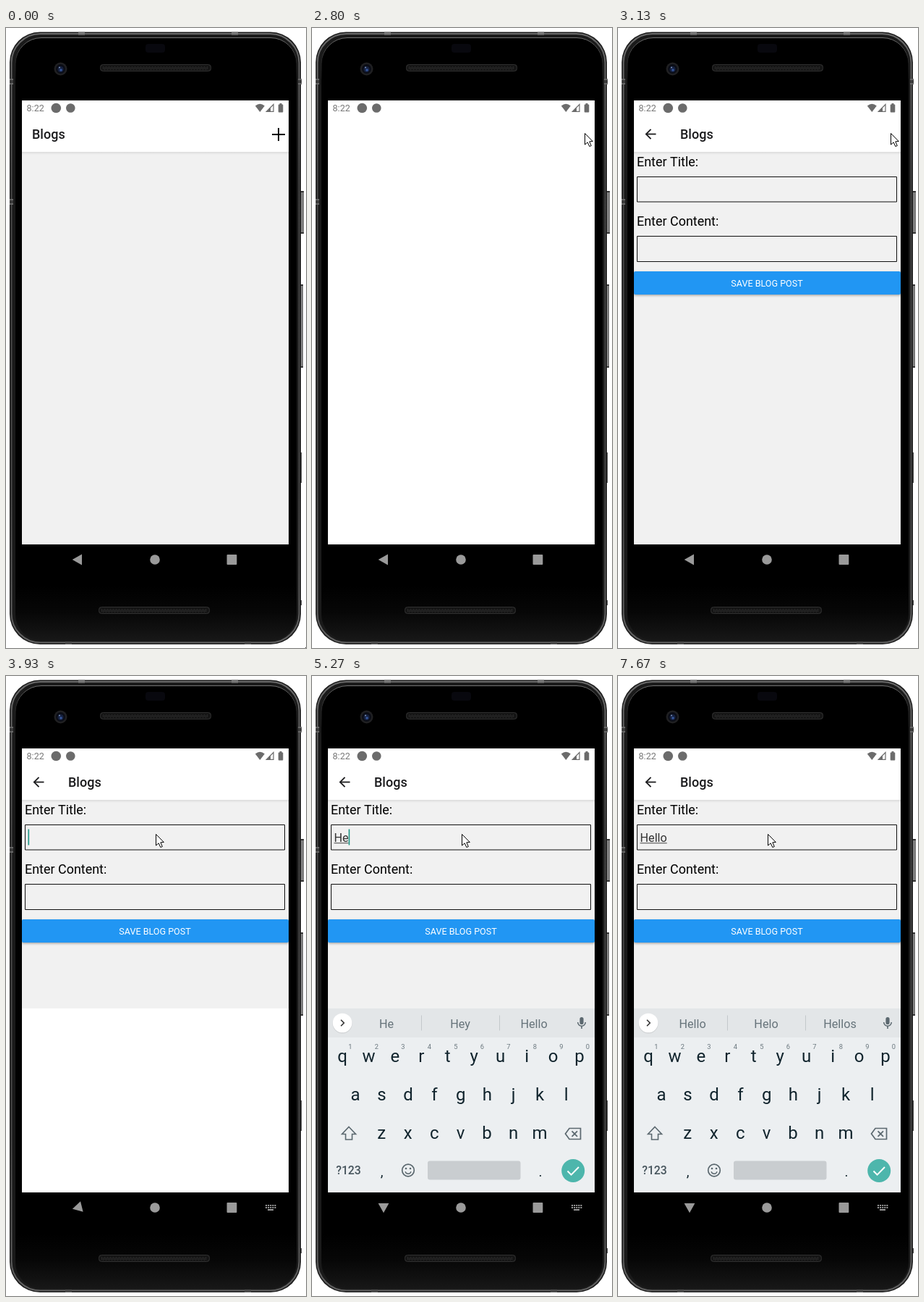
Animation of 415 by 856 pixels, one loop 8 s. Source, as an HTML page with a canvas:

```html
<!DOCTYPE html>
<html lang="en">
<head>
<meta charset="utf-8">
<title>Blog post form</title>
<style>
html, body { margin: 0; width: 100%; height: 100%; overflow: hidden; background: #fff; }
canvas { display: block; width: 415px; height: 856px; }
</style>
</head>
<body>
<canvas id="stage" width="415" height="856"></canvas>
<script>
const g = document.getElementById('stage').getContext('2d');
const LOOP = 8000, FRAME = 1000 / 15;
const SCREEN = { x: 22, y: 100, w: 369, h: 613 };
const PAGE = '#f1f1f1', INK = '#11242d', ICON = '#5b686f';

// ---- helpers ----
const lerp = (a, b, k) => a + (b - a) * k;
const clamp = k => Math.max(0, Math.min(1, k));
const smooth = k => k * k * (3 - 2 * k);

function rect(x, y, w, h, fill, r = 0) {
  g.fillStyle = fill;
  g.beginPath();
  g.roundRect(x, y, w, h, r);
  g.fill();
}
function box(x, y, w, h, stroke, width = 1, r = 0) {
  g.strokeStyle = stroke;
  g.lineWidth = width;
  g.beginPath();
  g.roundRect(x, y, w, h, r);
  g.stroke();
}
function disc(x, y, r, fill) {
  g.fillStyle = fill;
  g.beginPath();
  g.arc(x, y, r, 0, Math.PI * 2);
  g.fill();
}
function ring(x, y, r, stroke, width, from = 0, to = Math.PI * 2) {
  g.strokeStyle = stroke;
  g.lineWidth = width;
  g.beginPath();
  g.arc(x, y, r, from, to);
  g.stroke();
}
function trace(points, closed) {
  g.beginPath();
  points.forEach(([x, y]) => g.lineTo(x, y));
  if (closed) g.closePath();
}
function line(points, stroke, width, closed = false) {
  trace(points, closed);
  g.strokeStyle = stroke;
  g.lineWidth = width;
  g.stroke();
}
function poly(points, fill) {
  trace(points, true);
  g.fillStyle = fill;
  g.fill();
}
function text(s, x, y, size, fill, align = 'left', weight = 400) {
  g.font = `${weight} ${size}px Roboto, sans-serif`;
  g.textAlign = align;
  g.fillStyle = fill;
  g.fillText(s, x, y);
}
function gradient(x0, y0, x1, y1, ...colors) {
  const fade = g.createLinearGradient(x0, y0, x1, y1);
  colors.forEach((c, i) => fade.addColorStop(i / (colors.length - 1), c));
  return fade;
}
const vertical = (y0, y1, ...colors) => gradient(0, y0, 0, y1, ...colors);
const horizontal = (x0, x1, ...colors) => gradient(x0, 0, x1, 0, ...colors);

function layer(draw) {
  g.save();
  draw();
  g.restore();
}
function bezier(x, x1, y1, x2, y2) {
  const at = (s, a, b) => 3 * (1 - s) ** 2 * s * a + 3 * (1 - s) * s * s * b + s ** 3;
  let lo = 0, hi = 1;
  for (let i = 0; i < 24; i++) {
    const mid = (lo + hi) / 2;
    if (at(mid, x1, x2) < x) lo = mid; else hi = mid;
  }
  return at(lo, y1, y2);
}

// ---- phone ----
function speaker(x, y) {
  rect(x, y, 154, 10, '#151515', 4);
  box(x + .5, y + .5, 153, 9, '#303030', 1, 4);
  g.fillStyle = '#2b2b2b';
  for (let i = 4; i < 150; i += 2) g.fillRect(x + i, y + 3 + (i / 2 % 2), 1, 4);
}
function sideButton(y, h, w) {
  rect(406, y, w, h, horizontal(406, 406 + w, '#3a3a3a', '#8c8c8c', '#6a6a6a'), 1);
  rect(406, y, w, 2, '#333');
  rect(406, y + h - 2, w, 2, '#333');
}
function phone() {
  sideButton(225, 59, 6);
  sideButton(354, 115, 5);
  rect(406, 586, 3, 42, '#444');
  rect(406, 790, 3, 7, '#444');
  rect(5, 5.5, 403, 845.5, '#1b1b1b', 42);
  box(7.5, 8, 398, 840.5, vertical(8, 848, '#6a6a6a', '#444', '#444', '#444', '#606060'), 2, 40);
  box(10.5, 11, 392, 834.5, '#1a1a1a', 2.5, 38);
  rect(13, 13, 389, 832.5, vertical(770, 845, '#000', '#070707', '#171717'), 36);
  layer(() => {
    g.beginPath();
    g.rect(0, 0, 415, 70);
    g.clip();
    box(13, 13.5, 389, 832, vertical(13, 70, '#757575', '#2a2a2a', '#111'), 1, 36);
  });
  [[5, 70], [5, 236], [404, 70]].forEach(([x, y]) => {
    rect(x, y, 5, 8, '#666');
    rect(x, y + 2, 5, 4, '#3a3a3a');
  });
  [100, 312].forEach(x => rect(x, 5.5, 9, 4, '#777'));
  [82, 330].forEach(x => rect(x, 847, 9, 4, '#4a4a4a'));

  rect(193, 22, 27, 12, '#08080e', 4);
  disc(75.5, 56.5, 9, '#202022');
  disc(75.5, 56.5, 6.5, '#0b0d16');
  disc(75.5, 57, 4, '#16213f');
  disc(76, 58, 1.8, '#35569c');
  disc(74, 54.5, 1, '#7f95bd');
  speaker(130, 50);
  speaker(128, 799);
}

function statusBar() {
  const grey = '#6b6b6b';
  text('8:22', 28.5, 115.3, 12.6, '#777');
  disc(69.3, 110.5, 6.8, grey);
  disc(89.3, 110.5, 6.3, grey);
  g.fillStyle = grey;
  g.beginPath();
  g.moveTo(351.3, 116);
  g.lineTo(344.8, 107.5);
  g.quadraticCurveTo(351.3, 102, 357.8, 107.5);
  g.fill();
  line([[370, 105.5], [370, 115.3], [360.3, 115.3]], grey, 1.2, true);
  poly([[366, 109.5], [366, 115.5], [360, 115.5]], grey);
  rect(376.7, 105.5, 6.6, 11, grey, 1);
  rect(378.5, 104, 3, 2, grey);
}

function navBar(turn, keyboardIcon) {
  const grey = '#9a9a9a';
  layer(() => {
    g.translate(99, 734);
    g.rotate(-turn * Math.PI / 2);
    poly([[-7.3, 0], [6, -7.4], [6, 7.4]], grey);
  });
  disc(206, 734, 6.8, grey);
  rect(305.5, 727, 13.8, 14, grey, 1);
  if (!keyboardIcon) return;
  for (let row = 0; row < 2; row++)
    for (let i = 0; i < 5; i++) rect(359 + i * 3.1, 730 + row * 3, 2, 2, grey);
  rect(362, 736, 8, 2, grey);
}

// ---- app screens ----
function header(title, x) {
  rect(SCREEN.x, SCREEN.y, SCREEN.w, SCREEN.h, PAGE);
  rect(22, 171, 369, 4, vertical(171, 175, '#dcdcdc', PAGE));
  rect(22, 100, 369, 71, '#fff');
  text(title, x, 153.2, 18, '#1c1c1e', 'left', 500);
}
function listScreen(plusAlpha) {
  header('Blogs', 36);
  g.globalAlpha *= plusAlpha;
  rect(368, 146, 18, 2, '#000');
  rect(376, 138, 2, 18, '#000');
}
function formScreen() {
  header('Blogs', 86);
  line([[52.5, 146.5], [39, 146.5]], '#1c1c1e', 1.8);
  line([[45.5, 139.8], [38.8, 146.5], [45.5, 153.2]], '#1c1c1e', 1.8);
  text('Enter Title:', 26, 190.5, 17.96, '#000');
  box(26.5, 205.5, 359, 34.5, '#111');
  text('Enter Content:', 26, 272.8, 17.96, '#000');
  box(26.5, 287.5, 359, 35, '#111');
  layer(() => {
    g.shadowColor = 'rgba(0,0,0,.3)';
    g.shadowBlur = 3;
    g.shadowOffsetY = 1.5;
    rect(22, 336, 369, 32, '#2196f3', 2);
  });
  text('SAVE BLOG POST', 206, 357, 12.57, '#fff', 'center');
}
function field(typed, caretOn) {
  text(typed, 30.5, 228.6, 16.2, '#333');
  const w = g.measureText(typed).width;
  if (typed) rect(30.5, 230.2, w, 1, '#444');
  if (caretOn) rect(30.5 + w, 211.5, 1.6, 22, '#1a9484');
}

// ---- keyboard ----
function mic(x, y) {
  rect(x - 2.6, y - 8, 5.2, 10, ICON, 2.6);
  ring(x, y - 1, 5.3, ICON, 1.5, 0, Math.PI);
  line([[x, y + 4], [x, y + 8]], ICON, 1.6);
}
function tools() {
  ring(90.5, 477.5, 4.8, ICON, 1.8);
  line([[94, 481], [99.5, 486.5]], ICON, 2);
  line([[139.5, 473], [152.5, 473], [152.5, 481.5], [148, 486], [139.5, 486]], ICON, 1.6, true);
  line([[152, 481], [148, 481], [148, 486]], ICON, 1.2);
  disc(143.5, 477, 1, ICON);
  disc(148.5, 477, 1, ICON);
  ring(146, 479, 3, ICON, 1.2, 0.2, 2.4);
  text('GIF', 199.5, 483.4, 12.4, ICON, 'center', 900);
  rect(248, 473, 14, 14, ICON, 1);
  rect(286, 469.5, 1, 20, '#c8cdd0');
  [314.5, 320.3, 326].forEach(x => disc(x, 479.5, 1.7, ICON));
}
function suggestions(words) {
  words.forEach((w, i) => text(w, 103 + i * 102, 485.5, 16.2, '#66737a', 'center'));
  [151, 259].forEach(x => rect(x, 468.5, 1, 21, '#c3c8cb'));
}
function keyboard(caps, words) {
  rect(22, 459, 369, 254, '#eceff1');
  rect(22, 459, 369, 40, '#e3e6e8');
  disc(42, 480, 13.5, 'rgba(0,0,0,.1)');
  disc(42, 479, 13.3, '#fff');
  const d = words ? 1 : -1;
  line([[42 - d * 2, 474.8], [42 + d * 2.2, 479], [42 - d * 2, 483.2]], '#333', 1.6);
  if (words) suggestions(words); else tools();
  mic(373, 479);

  [['qwertyuiop', 42, 533], ['asdfghjkl', 60, 586], ['zxcvbnm', 96.3, 639]].forEach(([row, x, y]) =>
    [...row].forEach((key, i) =>
      text(caps ? key.toUpperCase() : key, x + i * 36.45, y + (caps ? 1.8 : 0), 24, INK, 'center')));
  for (let i = 0; i < 10; i++) text((i + 1) % 10, 52.8 + i * 36.5, 515.3, 9.3, '#6a777e', 'center');

  const shift = [[51, 622.5], [60.5, 632.5], [55.5, 632.5], [55.5, 640], [46.5, 640], [46.5, 632.5], [41.5, 632.5]];
  if (caps) poly(shift, '#46545c'); else line(shift, ICON, 1.6, true);

  line([[350.5, 632], [356, 624.5], [371.5, 624.5], [371.5, 639.5], [356, 639.5]], ICON, 1.7, true);
  line([[359.5, 628.3], [367, 635.8]], ICON, 1.7);
  line([[367, 628.3], [359.5, 635.8]], ICON, 1.7);

  text('?123', 50.5, 688.3, 15.8, '#46545c', 'center', 500);
  text(',', 96.5, 691, 19, INK, 'center');
  ring(133, 682.5, 8.3, ICON, 1.7);
  disc(130, 680, 1.3, ICON);
  disc(136, 680, 1.3, ICON);
  ring(133, 683, 4.2, ICON, 1.5, 0.3, 2.84);
  rect(160, 669.5, 128.5, 26, '#c9cdd0', 3);
  text('.', 316, 691, 19, INK, 'center');
  disc(361.2, 683, 16, '#4db6ac');
  line([[353.5, 683.5], [358.6, 688.6], [369, 678]], '#fff', 2);
}

function pointer(x, y) {
  layer(() => {
    g.translate(x + .5, y + .5);
    const arrow = [[0, 0], [0, 15.5], [3.7, 12.3], [6.3, 18], [8.8, 17], [6.3, 11.3], [10.8, 11]];
    poly(arrow, '#fff');
    line(arrow, '#000', 1, true);
  });
}

// ---- timeline ----
const typing = [
  [5000, 'H', ['Hi', 'He', 'Hey']],
  [5270, 'He', ['He', 'Hey', 'Hello']],
  [5530, 'Hel', ['Hel', 'Hello', 'Help']],
  [5670, 'Hell', ['Hell', 'Hello', 'He’ll']],
  [6130, 'Hello', ['Hello', 'Helo', 'Hellos']]
];
const within = (t, from, to) => t >= from && t < to;

function pointerAt(t, now) {
  if (t < 1000) return [414, 855];
  if (t < 1870) return null;
  if (t < 1930) return [406, 153];
  if (t < 2000) return [384, 147];
  const k = smooth(clamp((now - 3130) / 335));
  return [Math.round(lerp(377, 207, k)), Math.round(lerp(145, 218, k))];
}

function appScreen(t, now) {
  if (t < 2800) {
    layer(() => listScreen(t >= 2470 ? 0.2 : 1));
    return;
  }
  const p = bezier(clamp((now - 2733) / 400), .35, .45, 0, 1);
  const scale = lerp(.85, 1, p);
  layer(() => {
    g.globalAlpha = clamp((p - .75) / .125);
    if (scale < .9995) {
      g.translate(206.3, 406.5);
      g.scale(scale, scale);
      g.translate(-206.3, -406.5);
    }
    formScreen();
  });
  const step = typing.filter(s => t >= s[0]).pop();
  const caretOn = within(t, 3800, 4330) || within(t, 4800, 6670) || within(t, 7130, 7670);
  field(step ? step[1] : '', caretOn);

  if (t < 3870) return;
  rect(22, 459, 369, 254, '#fff');
  if (t < 4000) return;
  const rise = 1 - (1 - clamp((now - 3940) / 190)) ** 3;
  layer(() => {
    g.globalAlpha = lerp(.4, 1, rise);
    g.translate(0, (1 - rise) * 25);
    keyboard(t < 5070, t >= 5070 ? step[2] : null);
  });
}

function draw(t) {
  t += 4;
  const now = Math.floor(t / FRAME) * FRAME;
  g.fillStyle = '#fff';
  g.fillRect(0, 0, 415, 856);
  phone();
  layer(() => {
    g.beginPath();
    g.rect(SCREEN.x, SCREEN.y, SCREEN.w, SCREEN.h);
    g.clip();
    rect(SCREEN.x, SCREEN.y, SCREEN.w, SCREEN.h, '#fff');
    appScreen(t, now);
    statusBar();
  });
  navBar(smooth(clamp((now - 3867) / 266)), t >= 3870);
  const at = pointerAt(t, now);
  if (at) pointer(...at);
}

function tick() {
  draw(performance.now() % LOOP);
  requestAnimationFrame(tick);
}
tick();
</script>
</body>
</html>
```
